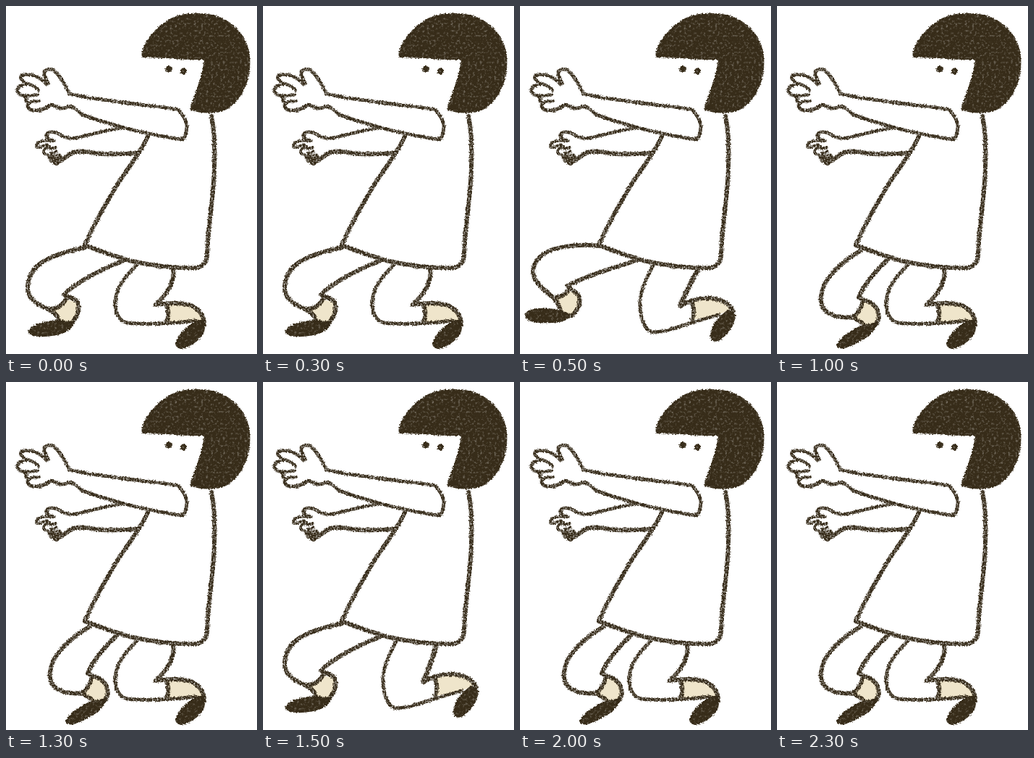
Recreate the animation shown at these times as an HTML page. Size 347 px wide and 480 px high, loop 2.5 s.

```html
<!DOCTYPE html>
<html lang="en">
<head>
<meta charset="utf-8">
<title>Sneaking girl</title>
<style>
  html, body { margin: 0; width: 100%; height: 100%; overflow: hidden; background: #fff; }
  svg { display: block; width: 100%; height: 100%; }
  .line { fill: none; stroke: #352a18; stroke-width: 6; stroke-linecap: round; stroke-linejoin: round; }
  .hand { stroke-width: 4.8; }
  .thin { stroke-width: 4; }
  .bold { stroke-width: 6.8; }
  .ink { fill: #372c19; }
  .sock { fill: #efe5cb; }
  .pose { visibility: hidden; animation: 2.5s step-end infinite; }
  .mid { animation-name: mid; }
  .wide { animation-name: wide; }
  .tucked { animation-name: tucked; }
  .near { animation-name: near; }
  .far { animation-name: far; }
  .slack { animation-name: slack; }
  @keyframes mid { 0%, 60% { visibility: visible } 20%, 80%, 100% { visibility: hidden } }
  @keyframes wide { 0%, 40%, 100% { visibility: hidden } 20% { visibility: visible } }
  @keyframes tucked { 0%, 60% { visibility: hidden } 40%, 80%, 100% { visibility: visible } }
  @keyframes near { 0%, 40%, 80%, 100% { visibility: visible } 20%, 60% { visibility: hidden } }
  @keyframes far { 0%, 40%, 80%, 100% { visibility: hidden } 20%, 60% { visibility: visible } }
  @keyframes slack { 0%, 80%, 100% { visibility: hidden } 60% { visibility: visible } }
</style>
</head>
<body>
<svg viewBox="0 0 347 480">
  <defs>
    <!-- Crayon: ragged edges plus paper grain -->
    <filter id="crayon" filterUnits="userSpaceOnUse" x="0" y="0" width="347" height="480" color-interpolation-filters="sRGB">
      <feTurbulence type="fractalNoise" baseFrequency=".5" numOctaves="2" seed="4" result="noise"/>
      <feDisplacementMap in="SourceGraphic" in2="noise" scale="4" xChannelSelector="R" yChannelSelector="G" result="rough"/>
      <feTurbulence type="fractalNoise" baseFrequency=".45" numOctaves="2" seed="9"/>
      <feColorMatrix values="0 0 0 0 0  0 0 0 0 0  0 0 0 0 0  0 0 0 2.2 -.2" result="grain"/>
      <feComposite in="rough" in2="grain" operator="in"/>
    </filter>
    <filter id="wax" filterUnits="userSpaceOnUse" x="0" y="0" width="347" height="480" color-interpolation-filters="sRGB">
      <feTurbulence type="fractalNoise" baseFrequency=".5" numOctaves="2" seed="2" result="noise"/>
      <feDisplacementMap in="SourceGraphic" in2="noise" scale="4" xChannelSelector="R" yChannelSelector="G" result="rough"/>
      <feTurbulence type="fractalNoise" baseFrequency=".3" numOctaves="3" seed="7"/>
      <feColorMatrix values="0 0 0 0 0  0 0 0 0 0  0 0 0 0 0  0 0 0 .9 .58" result="grain"/>
      <feComposite in="rough" in2="grain" operator="in"/>
    </filter>
  </defs>

  <g class="sock">
    <path class="pose mid" d="M62 419Q78 416 83 405L96 408C101 418 98 430 90 437L74 434Q73 426 62 419Z"/>
    <path class="pose wide" d="M48 402Q60 401 66 393L79 396C84 408 79 420 70 427L57 420Q55 410 48 402Z"/>
    <path class="pose tucked" d="M104 430Q117 421 118 408L132 411C141 420 141 432 135 438L119 440Z"/>
    <path class="pose near" d="M222 413Q240 410 255 414C266 420 272 428 271 434L222 436Q227 424 222 413Z"/>
    <path class="pose far" d="M238 409C255 402 277 402 291 418L275 426L239 433Q243 420 238 409Z"/>
  </g>

  <g class="ink" filter="url(#wax)">
    <path d="M187 68C190 49 207 28 228 17C245 8 270 8 290 13C316 22 334 42 337 68C340 100 328 126 308 141C295 150 269 149 254 143C259 125 271 100 274 74C250 75 215 71 190 71Z"/>
    <ellipse cx="225" cy="87" rx="5" ry="4.200"/>
    <ellipse cx="245.500" cy="90" rx="4.500" ry="4.400"/>
    <path class="pose mid" d="M30 449C36 438 55 434 75 433L92 435C95 443 86 450 70 454C55 457 33 458 30 449Z"/>
    <path class="pose wide" d="M6 425C14 415 30 416 50 418L69 424C71 432 60 436 45 437C25 438 7 437 6 425Z"/>
    <path class="pose tucked" d="M82 468C88 456 100 448 118 440L138 436C138 448 125 458 112 464C100 471 86 477 82 468Z"/>
    <path class="pose near" d="M234 466C237 455 248 442 264 433L274 433C278 445 273 455 262 464C250 473 236 477 234 466Z"/>
    <path class="pose far" d="M263 455C264 440 274 428 289 418L298 426C298 440 288 452 278 460C270 465 263 463 263 455Z"/>
  </g>

  <g class="line" filter="url(#crayon)">
    <!-- dress -->
    <path d="M196 180C186 202 170 222 156 243C138 272 122 300 109 330C130 338 150 345 170 351C200 358 235 362 265 361C273 358 277 354 278 346C278 310 288 260 288 220C289 190 288 170 284 152"/>
    <!-- upper arm -->
    <path class="hand" d="M88 121C110 127 140 130 160 133C185 136 215 139 238 143C246 152 251 160 250 168C249 176 248 181 245 184C215 181 180 172 160 167C135 160 115 154 104 149"/>
    <g class="hand">
      <path d="M88 121C82 112 78 98 66 89C60 85 52 88 53 94C54 99 57 103 58 107"/>
      <path d="M56 108C48 98 32 91 22 96C18 99 22 103 27 106"/>
      <path d="M27 108C18 110 13 115 17 120Q21 124 29 124"/>
      <path d="M29 125C25 129 28 132 33 133C26 138 32 145 42 144C50 144 56 140 62 136C68 137 70 141 77 141C83 141 84 138 92 139L102 147"/>
      <path class="thin" d="M27 106Q38 109 45 116M29 124Q37 124 44 122M33 132L46 131"/>
    </g>
    <!-- lower arm -->
    <path class="hand" d="M160 168C135 172 115 178 97 182"/>
    <path d="M72 215C80 212 84 206 92 202C104 198 118 203 135 204C150 205 165 204 181 203"/>
    <g class="hand">
      <path d="M97 182C88 183 82 182 76 178C70 174 62 172 57 176C53 180 58 184 66 186"/>
      <path class="thin" d="M63 186C52 184 42 188 42 193C43 196 50 194 57 191M60 194C51 197 49 204 57 205M62 197L69 195M62 203L70 201"/>
      <path class="ink" d="M60 208L74 206L77 211L70 218L63 214Z"/>
    </g>
    <!-- left leg -->
    <g class="pose mid">
      <path d="M109 333C85 338 60 345 45 357C30 370 26 390 34 402C42 412 52 415 62 420Q72 426 73 434"/>
      <path d="M163 351C140 360 100 378 80 398C84 402 95 402 99 408C103 418 98 430 90 438"/>
      <path d="M62 418Q77 416 83 404"/>
    </g>
    <g class="pose wide">
      <path d="M109 331C85 328 50 331 34 341C20 350 14 365 21 377C27 388 38 396 46 402Q53 410 56 420"/>
      <path d="M163 350C135 360 90 372 66 386C70 392 80 394 82 402C84 414 78 422 70 428"/>
      <path d="M48 402Q60 401 66 393"/>
    </g>
    <g class="pose tucked">
      <path d="M116 337C95 350 72 368 64 388C58 405 60 418 72 424C82 430 95 429 106 430L119 438"/>
      <path d="M156 347C140 362 122 380 113 402C120 406 132 408 137 416C142 425 142 434 136 440"/>
      <path d="M105 429Q116 421 118 409"/>
    </g>
    <!-- right leg -->
    <g class="pose near">
      <path class="hand" d="M183 355C165 372 150 390 151 412C152 425 156 434 168 437C190 440 225 438 262 434"/>
      <path d="M231 363C234 380 222 398 207 412C225 410 245 408 258 414C268 420 275 428 273 440"/>
      <path d="M222 413Q227 424 222 436"/>
    </g>
    <g class="pose far">
      <path class="hand" d="M184 358C175 375 164 395 166 415C167 432 172 448 184 450C205 450 235 436 275 426"/>
      <path d="M222 414C228 409 240 405 252 403C272 401 290 408 295 422"/>
      <path d="M238 410Q243 420 238 432"/>
    </g>
    <path class="pose wide bold" d="M246 364C237 380 227 398 222 413"/>
    <path class="pose slack bold" d="M239 365C234 382 228 398 222 413"/>
  </g>
</svg>
</body>
</html>
```
